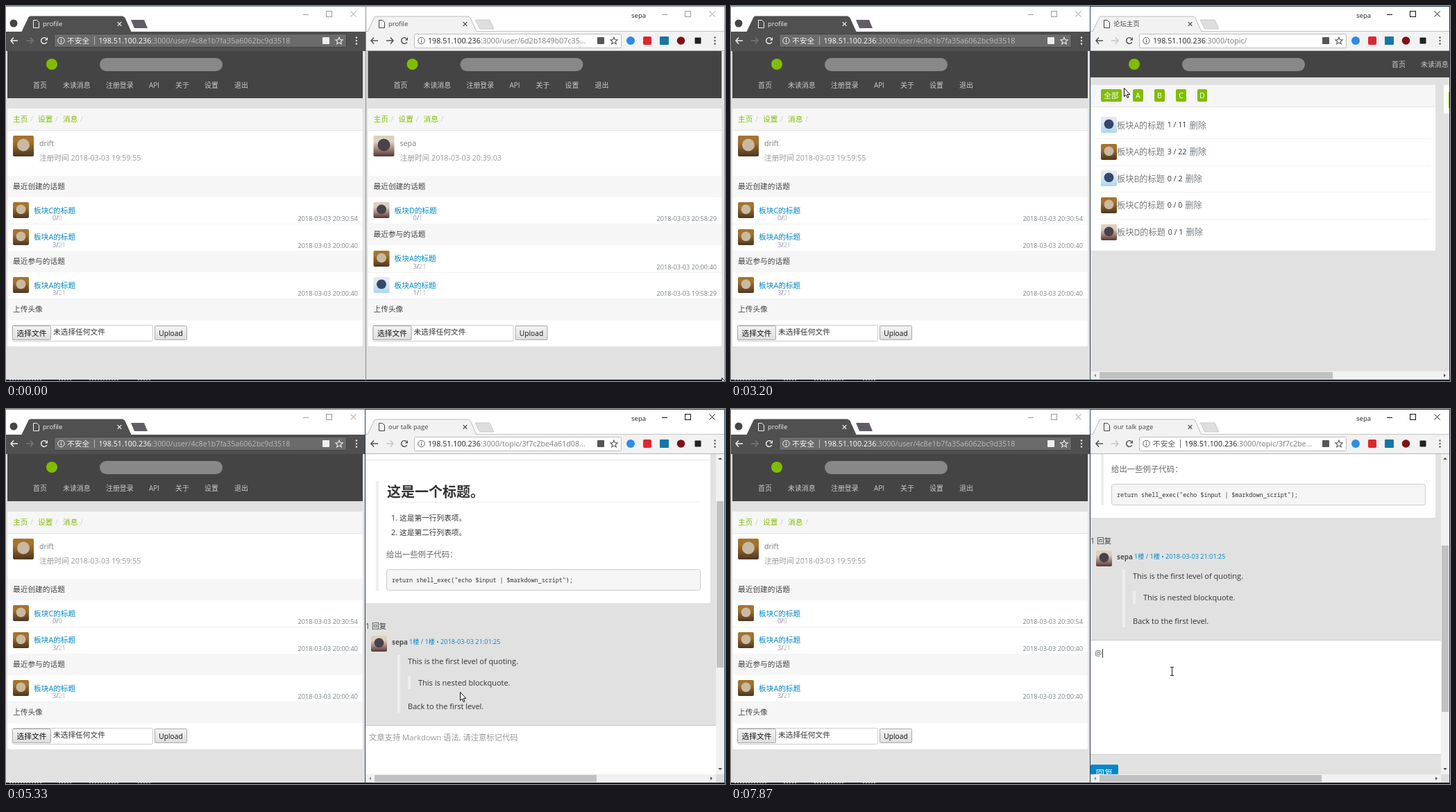
An HTML page with a canvas for the animation above (8000 ms loop, 1036 px wide and 541 px high).

```html
<!DOCTYPE html>
<html lang="zh-CN">
<head>
<meta charset="utf-8">
<title>forum</title>
<style>
  html, body { margin: 0; width: 100%; height: 100%; overflow: hidden; background: #e1e1e1; }
  canvas { display: block; width: 1036px; height: 541px; }
</style>
</head>
<body>
<canvas id="stage" width="1036" height="541"></canvas>
<script>
const ctx = document.getElementById('stage').getContext('2d');
const LOOP = 8000;
const SANS = '"Open Sans", "Noto Sans CJK SC", "Noto Sans CJK", sans-serif';
const MONO = '"Noto Sans Mono", "DejaVu Sans Mono", monospace';
const GREEN = '#80bd01', BLUE = '#0088cc', PAGE = '#e1e1e1', NAVBAR = '#444444';
const BODY = 10.7, SMALL = 9.17;
const HOST = '198.51.100.236';

// Moments at which the state of the right window changes.
const AT = { navHover: 2530, activate: 2930, list: 3130, titleHover: 3870, status: 4070, topic: 4470,
  scroll: 5230, beam: 5670, focus: 6600, caretOff: 7130, typed: 7600, unsafe: 7770 };

// Pointer way points: time, x, y.
const PATH = [
  [150, 1031, 536], [800, 870, 437], [950, 870, 437], [1250, 843, 310], [1530, 896, 170],
  [1800, 890, 91], [1850, 890, 91], [2300, 640, 100], [2670, 566, 118], [3250, 566, 118],
  [3730, 580, 147], [3770, 580, 147], [3930, 580, 166], [4400, 580, 166], [5070, 654, 408],
  [5600, 655, 408], [6070, 634, 383], [6130, 634, 383], [6600, 635, 378]
];

function rect(x, y, w, h, color) {
  ctx.fillStyle = color;
  ctx.fillRect(x, y, w, h);
}

function box(x, y, w, h, r, fill, stroke) {
  ctx.beginPath();
  ctx.roundRect(x, y, w, h, r);
  paint(fill, stroke);
}

function paint(fill, stroke, width = 1) {
  if (fill) { ctx.fillStyle = fill; ctx.fill(); }
  if (stroke) { ctx.strokeStyle = stroke; ctx.lineWidth = width; ctx.stroke(); }
}

function disc(x, y, r, fill, stroke, width) {
  ctx.beginPath();
  ctx.arc(x, y, r, 0, Math.PI * 2);
  paint(fill, stroke, width);
}

function poly(points, fill, stroke, width, open) {
  ctx.beginPath();
  points.forEach(([x, y]) => ctx.lineTo(x, y));
  if (!open) ctx.closePath();
  paint(fill, stroke, width);
}

const line = (points, color, width = 1) => poly(points, null, color, width, true);

// Draws text centred vertically on cy and returns its width.
function text(str, x, cy, size, color, { weight = 400, align = 'left', family = SANS } = {}) {
  ctx.font = `${weight} ${size}px ${family}`;
  ctx.textAlign = align;
  ctx.fillStyle = color;
  ctx.fillText(str, x, cy + size * 0.37);
  return ctx.measureText(str).width;
}

function clipped(x, y, w, h, draw) {
  ctx.save();
  ctx.beginPath();
  ctx.rect(x, y, w, h);
  ctx.clip();
  draw();
  ctx.restore();
}

const AVATARS = {
  brown: ['#a5732c', '#4d3521', '#c8b9a2'],
  dark: ['#ddd0c0', '#5a3532', '#48424c'],
  pale: ['#e6e8ec', '#a9d7f0', '#34486e']
};

function avatar(kind, x, y, size) {
  const [top, bottom, shape] = AVATARS[kind];
  const shade = ctx.createLinearGradient(x, y, x, y + size);
  shade.addColorStop(0.3, top);
  shade.addColorStop(1, bottom);
  box(x, y, size, size, 2, shade);
  disc(x + size / 2, y + size * 0.45, size * 0.3, shape);
}

// ---- Browser frame ----

function windowButtons(x, color) {
  line([[x, 12.5], [x + 8, 12.5]], color);
  ctx.strokeStyle = color;
  ctx.strokeRect(x + 33.5, 7.5, 8, 8);
  cross(x + 72.5, 11.5, 4, color);
}

function cross(x, y, r, color, width = 1) {
  line([[x - r, y - r], [x + r, y + r]], color, width);
  line([[x - r, y + r], [x + r, y - r]], color, width);
}

function tab(x, title, fill, edge, ink) {
  poly([[x, 37], [x + 10, 16], [x + 12, 15], [x + 145, 15], [x + 148, 17], [x + 157, 37]], fill, edge, 1, true);
  poly([[x + 16.5, 20.5], [x + 21.5, 20.5], [x + 24.5, 23.5], [x + 24.5, 31.5], [x + 16.5, 31.5]], null, ink);
  text(title, x + 30, 26, 9.4, ink);
  cross(x + 140.5, 26, 2.8, ink, 1.2);
}

function arrowIcon(x, dir, color) {
  line([[x - 5, 50], [x + 5, 50]], color, 1.5);
  line([[x + dir, 45.5], [x + dir * 5, 50], [x + dir, 54.5]], color, 1.5);
}

function reloadIcon(x, color) {
  ctx.beginPath();
  ctx.arc(x, 50, 4.3, 0.5, 5.4);
  paint(null, color, 1.5);
  poly([[x + 5, 45], [x + 5, 49.5], [x + 0.8, 49.5]], color);
}

function infoIcon(x, color) {
  disc(x, 50, 4.7, null, color, 1);
  rect(x - 0.6, 47, 1.2, 1.3, color);
  rect(x - 0.6, 49.3, 1.2, 3.4, color);
}

function starIcon(x, color) {
  const points = Array.from({ length: 10 }, (_, i) => {
    const a = i * Math.PI / 5 - Math.PI / 2, r = i % 2 ? 2.4 : 5.4;
    return [x + r * Math.cos(a), 50.5 + r * Math.sin(a)];
  });
  poly(points, null, color, 1.1);
}

function toolbar(x, ink, dim, forward) {
  arrowIcon(x + 12, -1, ink);
  arrowIcon(x + 34, 1, forward);
  reloadIcon(x + 55, ink);
  infoIcon(x + 79.5, dim);
}

function barEnd(x, ink, dots) {
  box(x - 24, 45, 10, 10, 1, ink);
  starIcon(x, ink);
  [45.5, 50, 54.5].forEach(y => disc(dots, y, 1.2, ink));
}

function address(x, path, unsafe, ink, dim) {
  if (unsafe) {
    text('不安全', x, 50, BODY, unsafe);
    line([[x + 39.5, 44], [x + 39.5, 56]], dim);
    x += 45.5;
  }
  x += text(HOST, x, 50, BODY, ink);
  text(':3000/' + path, x, 50, BODY, dim);
}

function leftWindow() {
  rect(0, 0, 518, 541, '#ffffff');
  rect(0, 37, 518, 28, '#505050');
  disc(11, 25, 5.5, '#444444');
  tab(23, 'profile', '#505050', '#505050', '#f2f2f2');
  poly([[180, 20], [199, 20], [204, 32], [185, 32]], '#625d65');
  windowButtons(428, '#999999');
  box(69.5, 40.5, 421, 19, 2, '#6b6b6b', '#434343');
  toolbar(0, '#f0f0f0', '#eeeeee', '#777777');
  address(88, 'user/4c8e1b7fa35a6062bc9d3518', '#f5f5f5', '#ffffff', '#bababa');
  barEnd(480, '#eeeeee', 505);
  rect(0, 65, 518, 474, PAGE);
  profile({ left: 2, right: 514, name: 'drift', face: 'brown', joined: '2018-03-03 19:59:55',
    created: [['brown', 'C', 0, 0, '20:30:54'], ['brown', 'A', 3, 21, '20:00:40']],
    replied: [['brown', 'A', 3, 21, '20:00:40']] });
}

function rightFrame(t) {
  const active = t >= AT.activate;
  rect(518, 0, 518, 65, '#ffffff');
  rect(518, 37, 518, 28, '#f2f2f2');
  line([[518, 36.5], [1036, 36.5]], '#c4c4c4');
  const title = t < AT.list ? 'profile' : t < AT.topic ? '论坛主页' : 'our talk page';
  tab(521, title, '#f2f2f2', '#bbbbbb', '#444444');
  poly([[676, 20], [697, 20], [703, 33], [683, 33]], '#dedede', '#c8c8c8');
  text('sepa', 901, 13, 9.6, '#222222');
  windowButtons(945, active ? '#111111' : '#999999');
  box(588.5, 40.5, 298, 20, 2, '#ffffff', '#bdbdbd');
  toolbar(519, '#505050', '#606060', t < AT.list ? '#505050' : '#c5c5c5');
  const unsafe = t >= AT.unsafe;
  const path = t < AT.list ? 'user/6d2b1849b07c35...' : t < AT.topic ? 'topic/'
    : unsafe ? 'topic/3f7c2be...' : 'topic/3f7c2be4a61d08...';
  address(608, path, unsafe && '#555555', '#222222', '#7a7a7a');
  barEnd(876, '#555555', 1021.5);
  disc(900, 50, 6, '#2d8bea');
  box(918, 44, 12, 12, 2, '#e0262d');
  box(942, 44, 13, 12, 1, '#1676a8');
  disc(972.5, 50, 5.8, '#7d1018');
  box(992.5, 45.5, 9, 9, 1, '#222222');
  line([[518, 64.5], [1036, 64.5]], '#b5b5b5');
}

// ---- Pages ----

function navbar(x, left, right, height) {
  rect(left, 65, right - left, height, NAVBAR);
  disc(x + 64, 84, 8, GREEN);
  box(x + 133, 75, 177, 19, 9.5, '#888888');
}

function profile({ left, right, name, face, joined, created, replied, hover }) {
  const width = right - left;
  navbar(left, left, right, 68);
  const links = [['首页', 37], ['未读消息', 80], ['注册登录', 142], ['API', 204], ['关于', 242], ['设置', 284], ['退出', 327]];
  links.forEach(([label, x], i) => text(label, left + x, 114, 9.93, hover && !i ? '#ffffff' : '#cccccc'));

  box(left, 148, width, 343, 2, '#ffffff');
  rect(left, 148, width, 31, '#f6f6f6');
  rect(left, 179, width, 1, '#e5e5e5');
  ['主页', '设置', '消息'].forEach((label, i) => {
    text(label, left + 8 + i * 36, 163, BODY, GREEN);
    text('/', left + 33 + i * 36, 163, BODY, '#cccccc');
  });
  avatar(face, left + 8, 187, 30);
  text(name, left + 46, 198, BODY, '#778087');
  text('注册时间 ' + joined, left + 46, 219, BODY, '#999999');

  let y = 245;
  const header = label => {
    rect(left, y, width, 31, '#f6f6f6');
    text(label, left + 8, y + 15, BODY, '#444444');
    y += 31;
  };
  const row = ([kind, board, replies, views, time]) => {
    avatar(kind, left + 8, Math.round(y + 7), 23);
    text(`板块${board}的标题`, left + 38, y + 19, BODY, BLUE);
    let x = left + 65;
    x += text(replies, x, y + 30, SMALL, '#9e78c0');
    x += text('/', x, y + 30, SMALL, '#666666');
    text(views, x, y + 30, SMALL, '#b4b4b4');
    text('2018-03-03 ' + time, right - 7, y + 31, SMALL, '#778087', { align: 'right' });
    y += 38.5;
    rect(left, Math.floor(y), width, 1, '#f0f0f0');
  };
  header('最近创建的话题');
  created.forEach(row);
  header('最近参与的话题');
  replied.forEach(row);
  header('上传头像');

  box(left + 7.5, 460.5, 202, 23, 2, '#ffffff', '#cccccc');
  button(left + 7.5, 461.5, 55, '选择文件', BODY);
  text('未选择任何文件', left + 66, 470.5, BODY, '#333333');
  button(left + 212.5, 461.5, 46, 'Upload', 10.2);
}

function button(x, y, w, label, size) {
  const shade = ctx.createLinearGradient(0, y, 0, y + 20);
  shade.addColorStop(0, '#f4f4f4');
  shade.addColorStop(1, '#dddddd');
  box(x, y, w, 20, 1, shade, '#a8a8a8');
  text(label, x + w / 2, y + 10.5, size, '#111111', { align: 'center' });
}

function wideNav(x, right) {
  navbar(x, 518, right, 38);
  text('首页', x + 435, 84, 9.93, '#cccccc');
  text('未读消息', x + 477, 84, 9.93, '#cccccc');
}

function listPage(hover) {
  wideNav(517, 1036);
  box(518, 114, 497, 239, [0, 2, 2, 0], '#ffffff');
  rect(518, 114, 497, 31, '#f6f6f6');
  rect(518, 145, 497, 1, '#e5e5e5');
  const tags = [['全部', 533, 30], ['A', 579, 15], ['B', 610, 15], ['C', 641, 15], ['D', 672, 14]];
  tags.forEach(([label, x, w]) => {
    box(x, 120, w, 18, 2, GREEN);
    text(label, x + w / 2, 129, BODY, '#ffffff', { align: 'center' });
  });
  const topics = [['pale', 'A', '1 / 11'], ['brown', 'A', '3 / 22'], ['pale', 'B', '0 / 2'], ['brown', 'C', '0 / 0'], ['dark', 'D', '0 / 1']];
  topics.forEach(([kind, board, count], i) => {
    const y = 172 + i * 38.65;
    avatar(kind, 533, Math.round(y - 12), 23);
    let x = 556;
    const w = text(`板块${board}的标题`, x, y, 12.2, '#7c7c7c');
    if (hover && !i) rect(x, 178, w, 1, '#7c7c7c');
    x += w + 4;
    x += text(count, x, y - 0.5, BODY, '#333333') + 4;
    text('删除', x, y, 12.2, '#778087');
    if (i < 4) rect(525, Math.round(y + 19), 483, 1, '#f0f0f0');
  });
  rect(1027, 114, 9, 41, '#ffffff');
  rect(1034, 124, 2, 23, GREEN);
}

function topicPage(t) {
  wideNav(516, 1023);
  box(518, 114, 497, 271, [0, 2, 2, 0], '#ffffff');
  text('板块A的标题', 526, 139, 16.7, '#333333', { weight: 700 });
  text('• 发布于2018-03-03 19:58:29 • 作者 kol • 12 次浏览 • 来自 A', 526, 163, SMALL, '#838383');
  rect(518, 178, 497, 1, '#e5e5e5');
  rect(533, 209, 4, 158, '#eeeeee');
  text('这是一个标题。', 549, 225, 20, '#333333', { weight: 700 });
  rect(549, 239, 451, 1, '#eeeeee');
  ['这是第一行列表项。', '这是第二行列表项。'].forEach((item, i) => {
    text(`${i + 1}.`, 555, 262 + i * 21, BODY, '#333333');
    text(item, 567, 262 + i * 21, BODY, '#333333');
  });
  text('给出一些例子代码：', 548, 315, 11.4, '#666666');
  box(548.5, 336.5, 452, 30, 3, '#f5f5f5', '#cccccc');
  text('return shell_exec("echo $input | $markdown_script");', 556, 351.5, 8.37, '#333333', { family: MONO });

  text('1 回复', 518, 418, BODY, '#444444');
  avatar('dark', 526, 432, 23);
  text('sepa', 556, 441, 9.9, '#555555', { weight: 700 });
  text('1楼 / 1楼 • 2018-03-03 21:01:25', 581, 441, SMALL, BLUE);
  rect(564, 460, 4, 83, '#eeeeee');
  text('This is the first level of quoting.', 579, 469, 11, '#333333');
  rect(579, 490, 4, 19, '#eeeeee');
  text('This is nested blockquote.', 594, 500, 11, '#333333');
  text('Back to the first level.', 579, 534, 11, '#333333');

  rect(518, 561, 505, 166, '#cccccc');
  rect(518, 562, 505, 164, '#ffffff');
  const typed = t >= AT.typed;
  if (typed) text('@', 524, 580, 11.5, '#555555');
  else text('文章支持 Markdown 语法, 请注意标记代码', 523, 579, 11.3, '#999999');
  if (typed || (t >= AT.focus && t < AT.caretOff)) rect(typed ? 535 : 523, typed ? 574 : 573, 1, 13, '#333333');
  box(518, 741, 40, 24, 2, BLUE);
  text('回复', 538, 753, 12.2, '#ffffff', { align: 'center' });
}

function scrollbarX(right, thumbEnd) {
  rect(518, 527, right - 518, 12, '#f1f1f1');
  rect(531, 528, thumbEnd - 531, 10, '#c1c1c1');
  poly([[526, 530.5], [526, 535.5], [523, 533]], '#909090');
  poly([[right - 8, 530.5], [right - 8, 535.5], [right - 5, 533]], '#505050');
}

function scrollbarY(scroll) {
  rect(1023, 65, 12, 462, '#f1f1f1');
  rect(1024, 78 + Math.round(scroll * 0.522), 10, 240, '#c1c1c1');
  poly([[1026, 73], [1032, 73], [1029, 70]], scroll ? '#505050' : '#909090');
  poly([[1026, 518], [1032, 518], [1029, 521]], '#505050');
  rect(1023, 527, 12, 12, '#dcdcdc');
}

function statusBubble(path) {
  box(515.5, 523.5, 174, 18, [0, 3, 0, 0], '#f2f2f2', '#bcbcbc');
  text(HOST + ':3000/' + path, 520, 531.5, 9.3, '#666666');
}

function scrollAt(t) {
  const u = Math.min(1, Math.max(0, (t - AT.scroll) / 380));
  return Math.round(228 * (1 - (1 - u) ** 2));
}

function rightWindow(t) {
  rect(518, 65, 518, 476, PAGE);
  clipped(518, 65, 517, 474, () => {
    if (t < AT.list) {
      profile({ left: 521.5, right: 1031, name: 'sepa', face: 'dark', joined: '2018-03-03 20:39:03',
        created: [['dark', 'D', 0, 1, '20:58:29']],
        replied: [['brown', 'A', 3, 21, '20:00:40'], ['pale', 'A', 1, 11, '19:58:29']],
        hover: t >= AT.navHover });
      if (t >= AT.navHover) statusBubble('topic');
    } else if (t < AT.topic) {
      listPage(t >= AT.titleHover);
      scrollbarX(1035, 867);
      if (t >= AT.status) statusBubble('topic/3f7c2be4...');
    } else {
      const scroll = scrollAt(t);
      clipped(518, 65, 505, 462, () => {
        ctx.translate(0, -scroll);
        topicPage(t);
      });
      scrollbarX(1023, 851);
      scrollbarY(scroll);
    }
  });
  rightFrame(t);
}

function desktopEdge(t) {
  rect(0, 539, 1036, 2, '#16202b');
  [[5, 45], [76, 17], [120, 43], [190, 17]].forEach(([x, w]) => {
    for (let i = 0; i < w; i += 4) rect(x + i, 539, 2, 1, '#b5bcc2');
  });
  const active = t >= AT.activate;
  const edge = active ? '#28435a' : '#8b8f93';
  rect(0, 0, 518, 1, '#7c8790');
  rect(518, 0, 518, 1, edge);
  rect(active ? 517 : 518, 0, 1, 540, edge);
  rect(1035, 0, 1, 540, edge);
}

// ---- Pointer ----

function pointerAt(t) {
  const next = PATH.findIndex(p => p[0] > t);
  if (next === 0) return PATH[0].slice(1);
  if (next < 0) return PATH[PATH.length - 1].slice(1);
  const [t0, x0, y0] = PATH[next - 1], [t1, x1, y1] = PATH[next];
  const u = (t - t0) / (t1 - t0);
  const e = (u + u * u * (3 - 2 * u)) / 2;
  return [x0 + (x1 - x0) * e, y0 + (y1 - y0) * e];
}

const ARROW = [[0, 0], [0, 12], [2.7, 9.6], [4.6, 14], [6.5, 13.2], [4.6, 9], [8.3, 9]];
const HAND = [[-0.8, 0], [-1.6, 1], [-1.6, 10], [-4, 8], [-5, 9], [-2, 14.5], [-1, 18], [6, 18],
  [7, 13], [7, 8.5], [5, 7.3], [3, 6.5], [1.5, 6], [1.5, 1], [0.8, 0]];

function pointer(t) {
  const [x, y] = pointerAt(t).map(Math.round);
  ctx.save();
  ctx.translate(x + 0.5, y + 0.5);
  if (t >= AT.beam) {
    line([[0, -6], [0, 6]], '#222222');
    [-6, 6].forEach(v => line([[-2.5, v], [2.5, v]], '#222222'));
  } else {
    const hand = (t >= AT.navHover && t < AT.list) || (t >= AT.titleHover && t < AT.topic);
    poly(hand ? HAND : ARROW, '#ffffff', '#111111', 1);
  }
  ctx.restore();
}

function frame() {
  const t = performance.now() % LOOP;
  leftWindow();
  rightWindow(t);
  desktopEdge(t);
  pointer(t);
  requestAnimationFrame(frame);
}
frame();
</script>
</body>
</html>
```
